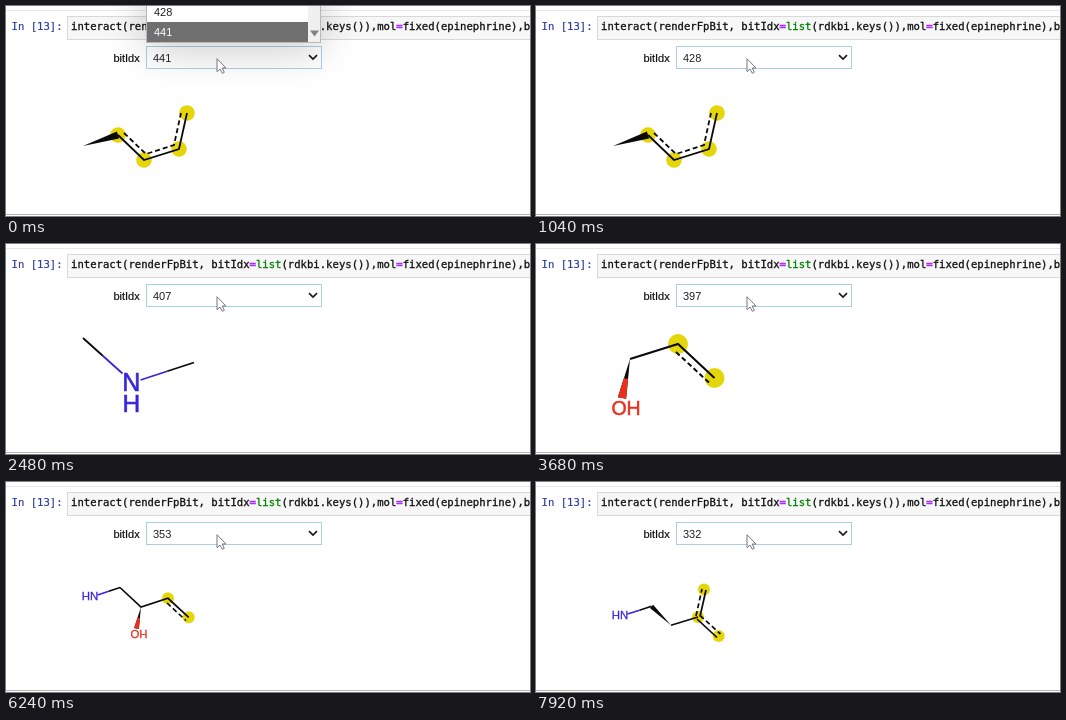
Recreate the animation shown at these times as an HTML page with a canvas. Size 524 px wide and 210 px high, loop 8 s.

```html
<!DOCTYPE html>
<html lang="en">
<head>
<meta charset="utf-8">
<title>Fingerprint bit viewer</title>
<style>
html, body { margin: 0; width: 100%; height: 100%; overflow: hidden; background: #fff; }
canvas { display: block; width: 524px; height: 210px; }
</style>
</head>
<body>
<canvas id="stage" width="524" height="210"></canvas>
<script>
const ctx = document.getElementById('stage').getContext('2d');
const LOOP = 8000;
const MONO = '10.6px "DejaVu Sans Mono", monospace';
const SANS = '"Liberation Sans", Arial, sans-serif';
const BLACK = '#0a0a0a', BLUE = '#3726dc', RED = '#e8301c', YELLOW = '#e4d608';

// A thin outline (weight) makes the glyphs a little heavier
function text(s, x, y, color, font, { align = 'left', weight = 0 } = {}) {
  ctx.font = font;
  ctx.fillStyle = ctx.strokeStyle = color;
  ctx.textAlign = align;
  ctx.fillText(s, x, y);
  if (weight) {
    ctx.lineWidth = weight;
    ctx.strokeText(s, x, y);
  }
}

function box(x, y, w, h, fill) {
  ctx.fillStyle = fill;
  ctx.fillRect(x, y, w, h);
}

function frame(x, y, w, h, color) {
  ctx.strokeStyle = color;
  ctx.lineWidth = 1;
  ctx.strokeRect(x + 0.5, y + 0.5, w - 1, h - 1);
}

function poly(points, fill) {
  ctx.beginPath();
  points.forEach(([x, y]) => ctx.lineTo(x, y));
  ctx.closePath();
  ctx.fillStyle = fill;
  ctx.fill();
}

function path(points, color = BLACK, width = 1.8, dash = []) {
  ctx.beginPath();
  points.forEach(([x, y]) => ctx.lineTo(x, y));
  ctx.strokeStyle = color;
  ctx.lineWidth = width;
  ctx.setLineDash(dash);
  ctx.stroke();
  ctx.setLineDash([]);
}

const dashed = (points, width = 1.8) => path(points, BLACK, width, [5, 3]);

function halos(r, points) {
  ctx.fillStyle = YELLOW;
  for (const [x, y] of points) {
    ctx.beginPath();
    ctx.arc(x, y, r, 0, 7);
    ctx.fill();
  }
}

const mid = (a, b) => [(a[0] + b[0]) / 2, (a[1] + b[1]) / 2];

// Bond whose halves take the colours of its two atoms
function split(a, b, c1, c2, width) {
  path([a, mid(a, b)], c1, width);
  path([mid(a, b), b], c2, width);
}

// Stereo bond widening from a to b
function wedge(a, b, half, tip = BLACK) {
  const dx = b[0] - a[0], dy = b[1] - a[1], len = Math.hypot(dx, dy);
  const nx = -dy / len * half, ny = dx / len * half;
  const l = [b[0] + nx, b[1] + ny], r = [b[0] - nx, b[1] - ny];
  poly([a, l, r], BLACK);
  if (tip !== BLACK) poly([mid(a, l), l, r, mid(a, r)], tip);
}

const atom = (s, x, y, size, color) =>
  text(s, x, y, color, size + 'px ' + SANS, { align: 'center', weight: size / 40 });

function diene() {
  const p = [[112, 129], [138, 154], [173, 143], [181, 107]];
  halos(7.8, p);
  wedge([77, 140], [112, 129], 3.6);
  path(p);
  dashed([[118, 127], [140, 148], [168, 139], [175, 107]]);
}

function amine() {
  split([77, 94], [116.5, 129.5], BLACK, BLUE, 1.8);
  split([134.5, 136], [188, 118.5], BLUE, BLACK, 1.8);
  atom('N', 125.3, 147.3, 25, BLUE);
  atom('H', 125.3, 168, 24.5, BLUE);
}

function alcohol() {
  const a = [94, 115], b = [142, 100], c = [178.5, 134];
  halos(10, [b, c]);
  wedge(a, [86, 154], 4.2, RED);
  path([a, b, c], BLACK, 2);
  dashed([[140, 108], [174, 139.5]], 2);
  atom('OH', 90, 171.3, 19.5, RED);
}

function aminoAlcohol() {
  const a = [123, 100], b = [149, 123], c = [182, 113];
  halos(7.3, [c]);
  split([95, 108.5], a, BLUE, BLACK);
  path([a, b]);
  wedge(b, c, 3);
  split(b, [143.3, 150.5], BLACK, RED);
  atom('HN', 85.5, 115.3, 13.5, BLUE);
  atom('OH', 146, 161.8, 13.5, RED);
}

function aminoChain() {
  const a = [114, 105.5], b = [135, 125], c = [162, 116.3], d = [182.7, 135.3];
  halos(6, [c, d]);
  split([91.5, 113], a, BLUE, BLACK, 1.6);
  path([a, b, c, d], BLACK, 1.7);
  dashed([[161, 121], [180, 138.5]], 1.6);
  wedge(b, [130.5, 146.5], 2.4, RED);
  atom('HN', 84, 118.2, 11.4, BLUE);
  atom('OH', 133, 156.4, 11.4, RED);
}

function branched() {
  const a = [115.5, 124.3], b = [135, 143.3], c = [162, 135], up = [168, 107.5], down = [182.7, 154];
  halos(6, [c, up, down]);
  split([91.5, 132], a, BLUE, BLACK, 1.6);
  wedge(b, a, 2.3);
  path([b, c], BLACK, 1.7);
  path([[164, 134.5], [170, 108]], BLACK, 1.7);
  dashed([[160, 134], [166, 107]], 1.7);
  path([[161, 137], [181, 155.5]], BLACK, 1.7);
  dashed([[164, 133.5], [184.5, 152]], 1.7);
  atom('HN', 84, 137, 11.4, BLUE);
}

// The picture trails the chosen value
const CLOSE = 480;
const values = [[0, '441'], [CLOSE, '428'], [2160, '407'], [3560, '397'], [5320, '353'], [6960, '332']];
const pictures = [[0, diene], [1960, amine], [3120, alcohol], [4080, aminoAlcohol], [5280, aminoChain], [7440, branched]];
const current = (steps, t) => steps.filter(([at]) => at <= t).pop()[1];

const code = [
  ['interact(renderFpBit, bitIdx', '#111'], ['=', '#a2f'], ['list', '#008000'],
  ['(rdkbi.keys()),mol', '#111'], ['=', '#a2f'], ['fixed(epinephrine),b', '#111']
];

function drawCell() {
  box(0, 0, 524, 210, '#fff');
  box(0, 4, 524, 1, '#e8e8e8');
  box(0, 208, 524, 1, '#b4b4b4');
  text('In [13]:', 5.5, 24, '#303f9f', MONO, { weight: 0.2 });
  box(61, 10, 470, 24, '#f7f7f7');
  frame(61, 10, 470, 24, '#d8d8d8');
  let x = 65;
  for (const [s, color] of code) {
    text(s, x, 24, color, MONO, { weight: s === '=' ? 0.6 : 0.3 });
    x += ctx.measureText(s).width;
  }
}

function drawSelect(value) {
  text('bitIdx', 133.7, 55.5, '#111', '11px ' + SANS, { align: 'right', weight: 0.2 });
  box(140, 40, 176, 23, '#fff');
  frame(140, 40, 176, 23, '#a9d0e2');
  text(value, 147, 55.5, '#222', '11px ' + SANS);
  path([[303, 49.2], [307, 53], [311, 49.2]], '#1a1a1a', 1.7);
}

function drawList() {
  ctx.save();
  ctx.shadowColor = 'rgba(0,0,0,0.2)';
  ctx.shadowBlur = 40;
  ctx.shadowOffsetY = 8;
  box(140, -60, 175, 97, '#fff');
  ctx.restore();
  frame(140, -60, 175, 97, '#b8b8b8');
  box(141, 16, 161, 20, '#707070');
  box(302, -1, 12, 37, '#f0f0f0');
  poly([[304, 24.5], [313, 24.5], [308.5, 30.5]], '#808080');
  text('428', 148, 10, '#222', '11px ' + SANS);
  text('441', 148, 30, '#fff', '11px ' + SANS);
}

function drawPointer() {
  const p = [[211, 52.7], [211, 65.7], [214, 63], [216.3, 67.3], [218.3, 66.3], [216.2, 62], [220, 62]];
  poly(p, '#fff');
  path([...p, p[0]], '#77777e', 1);
}

function draw(t) {
  drawCell();
  drawSelect(current(values, t));
  if (t < CLOSE) drawList();
  current(pictures, t)();
  drawPointer();
}

const start = performance.now();
function tick() {
  draw((performance.now() - start) % LOOP);
  requestAnimationFrame(tick);
}
tick();
</script>
</body>
</html>
```
